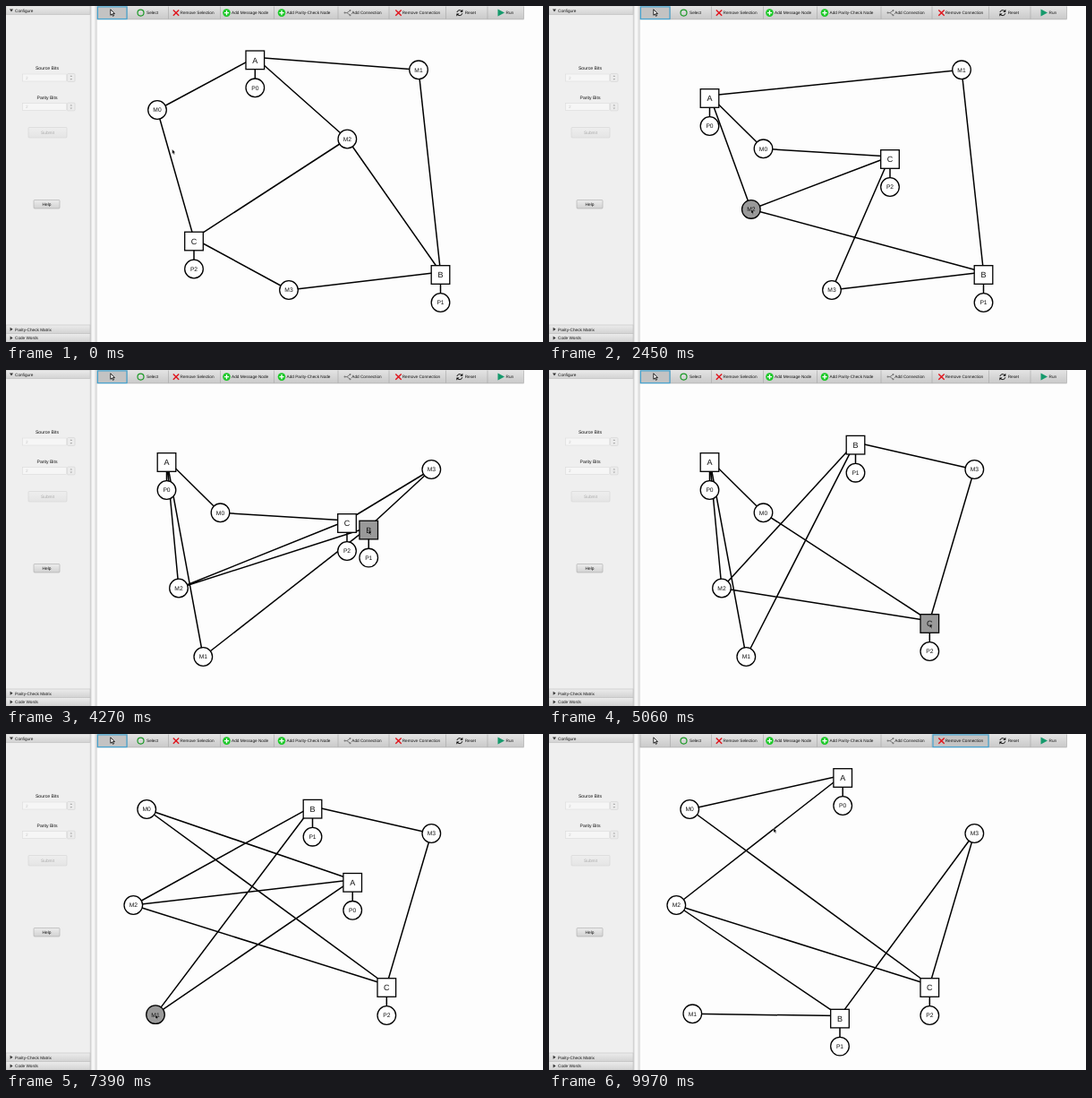
An HTML page that plays this animation: 600 by 375 pixels, repeating every 10000 ms.

```html
<!DOCTYPE html>
<html>
<head>
<meta charset="utf-8">
<style>
html, body { margin: 0; width: 100%; height: 100%; overflow: hidden; background: #fdfdfd; }
svg { display: block; width: 100vw; height: 100vh; font-family: "Liberation Sans", Arial, sans-serif; text-rendering: geometricPrecision; }
</style>
</head>
<body>
<svg viewBox="0 0 600 375">
  <defs>
    <linearGradient id="bar" x2="0" y2="1"><stop stop-color="#e4e4e4"/><stop offset="1" stop-color="#c9c9c9"/></linearGradient>
    <linearGradient id="head" x2="0" y2="1"><stop stop-color="#ececec"/><stop offset="1" stop-color="#d2d2d2"/></linearGradient>
  </defs>
  <g id="ui"></g>
  <g id="graph"></g>
</svg>
<script>
const LOOP = 10000, PICK = 9200, CUT = 9600;
const el = id => document.getElementById(id);
const text = (x, y, s, size = 4.7, anchor = 'start', fill = '#111') =>
  `<text x="${x}" y="${y + size * .36}" font-size="${size}" text-anchor="${anchor}" fill="${fill}">${s}</text>`;
const rect = (x, y, w, h, fill, more = '') =>
  `<rect x="${x}" y="${y}" width="${w}" height="${h}" fill="${fill}" ${more}/>`;
const path = (d, stroke, width, fill = 'none') =>
  `<path d="${d}" stroke="${stroke}" stroke-width="${width}" fill="${fill}"/>`;
const circle = (x, y, r, fill, stroke = 'none', width = 1) =>
  `<circle cx="${x}" cy="${y}" r="${r}" fill="${fill}" stroke="${stroke}" stroke-width="${width}"/>`;
const arrow = (x, y, k, fill, stroke, width) =>
  `<path transform="translate(${x} ${y}) scale(${k})" d="M0 0V5.2L1.2 4.1L2.1 6L3 5.6L2.1 3.8H3.7Z" fill="${fill}" stroke="${stroke}" stroke-width="${width}"/>`;

// Toolbar and side panel
const cross = x => path(`M${x - 3.2} 4.4l6.4 6.4m0 -6.4l-6.4 6.4`, '#e0141c', 1.4);
const plus = x => circle(x, 7.6, 4.3, '#1cc828') + path(`M${x - 2.6} 7.6h5.2m-2.6 -2.6v5.2`, '#fff', 1.3);
const header = (y, s, open) => rect(0, y, 94, 9.6, 'url(#head)', 'stroke="#b9b9b9" stroke-width=".5"') +
  `<path d="${open ? `M4 ${y + 3.6}h4l-2 3z` : `M4.6 ${y + 2.8}v4l3 -2z`}" fill="#333"/>` + text(10, y + 4.9, s);
const field = (y, s) => text(46, y - .4, s, 5.1, 'middle') +
  rect(18.5, y + 6, 49, 8, '#f6f6f6', 'stroke="#dcdcdc" stroke-width=".6"') + text(22, y + 10, '2', 4.7, 'start', '#c8c8c8') +
  rect(68.5, y + 5.6, 8.5, 8.8, '#ececec', 'rx="1" stroke="#d2d2d2" stroke-width=".6"') +
  `<path d="M71.5 ${y + 9}l1.3 -1.8l1.3 1.8zm0 2l1.3 1.8l1.3 -1.8z" fill="#aaa"/>`;
const button = (x, y, w, h, s, ink, edge) =>
  rect(x, y, w, h, 'url(#head)', `rx="1" stroke="${edge}" stroke-width=".6" fill-opacity="${ink == '#111' ? 1 : .35}"`) +
  text(x + w / 2, y + h / 2, s, 4.8, 'middle', ink);
const edges = [102, 135.5, 181.5, 239.5, 299.5, 371, 428, 491.5, 538, 578.5];

el('ui').innerHTML =
  rect(0, 0, 94, 375, '#efefef') + rect(94, 0, 7, 375, '#e6e6e6') +
  path('M94.3 0V375M101.2 0V375', '#bdbdbd', .6) + rect(96, 0, 3, 375, '#f6f6f6') +
  header(0, 'Configure', true) + header(356, 'Parity-Check Matrix') + header(365.6, 'Code Words') +
  field(70, 'Source Bits') + field(102.5, 'Parity Bits') +
  button(25, 135.5, 43, 11.5, 'Submit', '#aaa', '#d4d4d4') + button(31, 216.5, 29, 9.5, 'Help', '#111', '#aaa') +
  rect(101.5, 0, 477, 15, 'url(#bar)') + path('M101.5 14.9H578.5', '#ababab', .6) +
  edges.map(x => path(`M${x} .5V14.5`, '#a4a4a4', .6)).join('') +
  '<g id="chosen"></g>' + arrow(116.8, 3.8, 1.25, '#fff', '#111', .7) +
  circle(150.5, 7.6, 3.5, 'none', '#1d9a28', 1.2) + text(157, 7.6, 'Select') +
  cross(190) + text(194.5, 7.6, 'Remove Selection') +
  plus(246.5) + text(252, 7.6, 'Add Message Node') +
  plus(308) + text(313.5, 7.6, 'Add Parity-Check Node') +
  path('M378.5 7.6h2.5l3.5 -2.6M381 7.6l3.5 2.6', '#555', .7) +
  [[378.5, 7.6], [384.5, 5], [384.5, 10.2]].map(p => circle(...p, 1, '#777')).join('') + text(386.3, 7.6, 'Add Connection') +
  cross(438.5) + text(442.7, 7.6, 'Remove Connection') +
  path('M503.9 7A3 3 0 0 1 509 5.6M509.8 8.2A3 3 0 0 1 504.7 9.7', '#111', 1) +
  '<path d="M510.3 3.8v3h-3zM503.4 11.4v-3h3z"/>' + text(512.7, 7.6, 'Reset') +
  '<path d="M549.5 3.6l7.5 4l-7.5 4z" fill="#159a6c"/>' + text(558.5, 7.6, 'Run');

// Graph
const LIFT = 3; // links meet a square this far above its centre
const home = { A: [278.3, 60.3], B: [485.5, 300], C: [210, 262.5], M0: [169, 116], M1: [461, 71.3], M2: [381.3, 148.5], M3: [316, 317] };
const links = ['A M0', 'A M1', 'A M2', 'C M0', 'C M2', 'C M3', 'B M1', 'B M2', 'B M3'].map(s => s.split(' '));
// node, start, end, destination, grab offset, bend point
const drags = [
  ['A', 290, 550, [179.5, 103]],
  ['M0', 960, 1330, [239.5, 159.3]],
  ['C', 1552, 1952, [381, 171], [12, -6], [301, 234]],
  ['M2', 2150, 2560, [193, 243.5]],
  ['M1', 2830, 3305, [220.3, 320], [0, 0], [342, 214]],
  ['M3', 3490, 3880, [475.3, 111]],
  ['B', 4060, 4450, [342.5, 83.7]],
  ['C', 4640, 5040, [425.3, 283]],
  ['A', 5270, 5680, [387.2, 165.8]],
  ['M0', 5870, 6280, [157.2, 84], [3, -1]],
  ['M2', 6470, 6900, [142.3, 191]],
  ['M1', 7090, 7470, [160.3, 312.3]],
  ['B', 7660, 8100, [325, 317.6]],
  ['A', 8270, 8700, [328.2, 49], [1, 14]]
];
const smooth = u => (u = Math.max(0, Math.min(1, u)), u * u * (3 - 2 * u));
const mix = (a, b, e) => a.map((v, i) => v + (b[i] - v) * e);
const add = (a, b) => [a[0] + b[0], a[1] + b[1]];

// Pointer trips: start, end, from, to, bend
const trips = [];
let tip = [185.7, 160], free = 30;
const trip = (t0, t1, to, bend) => { trips.push([t0, t1, tip, to, bend]); tip = to; };
const at = { ...home };
for (const d of drags) {
  const [name, t0, t1, to, grab = [0, 0], bend] = d;
  d.from = at[name];
  d.bend = bend || mix(d.from, to, .5);
  at[name] = to;
  trip(Math.max(free, t0 - 260), t0 - 40, add(d.from, grab));
  trip(t0, t1, add(to, grab), add(d.bend, grab));
  free = t1 + 40;
}
trip(8780, 9150, [462, 8]);
trip(9240, 9550, [272, 137]);
trip(9640, 9960, [251, 105]);

const along = (t, t0, t1, a, b, bend = mix(a, b, .5)) => {
  const e = smooth((t - t0) / (t1 - t0));
  return mix(mix(a, bend, e), mix(bend, b, e), e);
};

function draw(t) {
  const pos = { ...home };
  let held;
  for (const d of drags) {
    const [name, t0, t1, to] = d;
    if (t >= t0) pos[name] = along(t, t0, t1, d.from, to, d.bend);
    if (t >= t0 - 40 && t < t1 + 40) held = name;
  }
  let lines = '', nodes = '';
  for (const [a, b] of links) {
    if (a + b == 'AM1' && t >= CUT) continue;
    const [x, y] = pos[a];
    lines += `M${x} ${y - LIFT}L${pos[b]}`;
  }
  for (const name in pos) {
    const [x, y] = pos[name], fill = name == held ? '#999' : '#fff';
    if (name[1]) {
      nodes += circle(x, y, 10.3, fill, '#000', 1.3) + text(x, y, name, 6.7, 'middle');
    } else {
      lines += `M${x} ${y}v31`;
      nodes += circle(x, y + 31, 10.3, '#fff', '#000', 1.3) + text(x, y + 31, 'P' + 'ABC'.indexOf(name), 6.7, 'middle') +
        rect(x - 10.3, y - 10.3, 20.6, 20.6, fill, 'stroke="#000" stroke-width="1.3"') + text(x, y, name, 9, 'middle');
    }
  }
  let cursor = trips[0][2];
  for (const p of trips) if (t >= p[0]) cursor = along(t, ...p);
  el('graph').innerHTML = path(lines, '#000', 1.5) + nodes + arrow(...cursor, .95, '#000', '#fff', .3);
  const [x, w] = t < PICK ? [102.4, 32.6] : [429, 62];
  el('chosen').innerHTML = rect(x, .9, w, 13.6, '#c3c3c3', 'stroke="#45a3cf" stroke-width="1.2"');
}

const start = performance.now();
function tick() {
  draw((performance.now() - start) % LOOP);
  requestAnimationFrame(tick);
}
tick();
</script>
</body>
</html>
```
